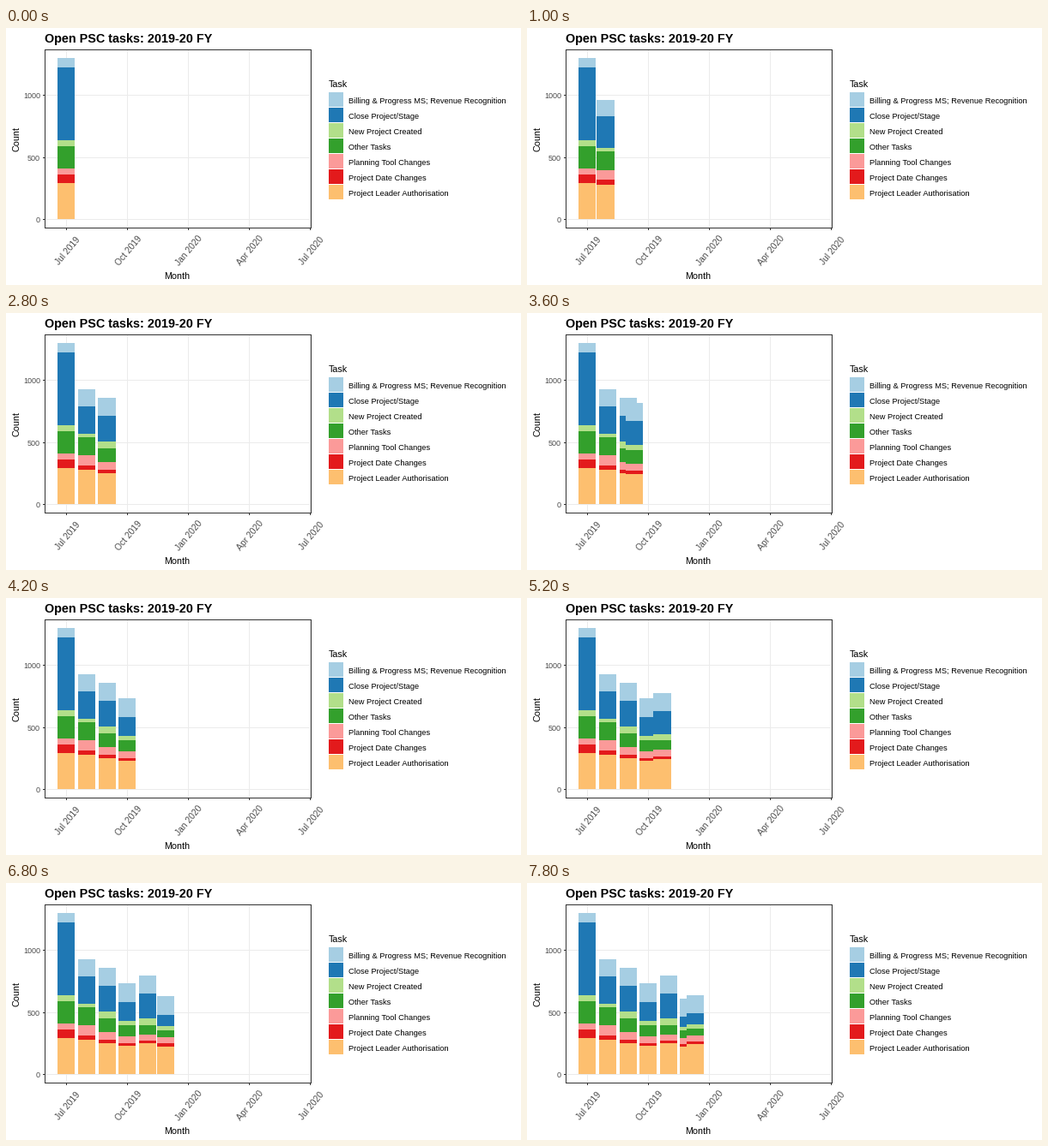
Recreate the animation shown at these times as a matplotlib script. Size 600 by 300 pixels, loop 8000 ms.

```python
import matplotlib.pyplot as plt
import numpy as np
from matplotlib.animation import FuncAnimation
from matplotlib.patches import Rectangle

W, H, DPI = 600, 300, 100
FRAMES, INTERVAL = 40, 200

TASKS = {
    "Billing & Progress MS; Revenue Recognition": "#A6CEE3",
    "Close Project/Stage": "#1F78B4",
    "New Project Created": "#B2DF8A",
    "Other Tasks": "#33A02C",
    "Planning Tool Changes": "#FB9A99",
    "Project Date Changes": "#E31A1C",
    "Project Leader Authorisation": "#FDBF6F",
}
GRID, DARK, GREY = "#EBEBEB", "#333333", "#4D4D4D"

BASE = 223
DAY_PX = 0.776
LEFT, RIGHT = 59.53, 79.77

MONTHS = np.arange("2019-07", "2020-08", dtype="datetime64[M]")
DATES = MONTHS.astype("datetime64[D]")
DAYS = (DATES - DATES[0]).astype(int)

# Monthly totals and largest steady share, in pixels; the rest follow trends.
TOTAL = np.array([188.4, 134, 124, 105.7, 115, 88, 101])
LEADER = np.array([42, 40, 36, 33, 36, 32, 40])


def stack_tops():
    m = np.arange(len(TOTAL))
    billing = 21.5 - 10.5 * 0.15 ** m
    created = 6 + 1.5 * (-1.0) ** m
    other = 26 * 0.8 ** m
    planning = 7 + 26 * m * 0.2 ** m
    dates = 3.2 + 6.8 * 0.25 ** m
    closed = TOTAL - (billing + created + other + planning + dates + LEADER)
    parts = np.array([billing, closed, created, other, planning, dates, LEADER])
    return BASE - np.cumsum(parts[::-1], axis=0)[::-1].T


TOPS = stack_tops()
STARTS = [int(7.2 * i + 0.65) for i in range(len(TOTAL))]

plt.rcParams["font.family"] = "Liberation Sans"
fig = plt.figure(figsize=(W / DPI, H / DPI), dpi=DPI, facecolor="white")
ax = fig.add_axes([0, 0, 1, 1])
ax.set_xlim(0, W)
ax.set_ylim(H, 0)
ax.axis("off")


def box(x0, y0, x1, y1, color, z=1):
    patch = Rectangle((x0, y0), x1 - x0, y1 - y0, facecolor=color,
                      linewidth=0, antialiased=False, snap=False, zorder=z)
    return ax.add_patch(patch)


def label(x, y, text, px, color="black", ha="left", va="baseline", **kw):
    ax.text(x, y, text, fontsize=px * 72 / DPI, color=color, ha=ha, va=va, **kw)


def whole(v):
    return np.floor(np.asarray(v) + 0.5).astype(int)


def new_bar(z):
    return [box(0, 0, 0, 0, color, z) for color in TASKS.values()]


def place(bar, day, tops):
    x0, x1 = whole([LEFT + day * DAY_PX, RIGHT + day * DAY_PX])
    ys = np.append(whole(tops), BASE)
    for part, y0, y1 in zip(bar, ys, ys[1:]):
        part.set_bounds(x0, y0, x1 - x0, y1 - y0)


def ease(t):
    return 4 * t ** 3 if t < 0.5 else 1 - 4 * (1 - t) ** 3


def draw_panel():
    for date, day in zip(DATES[::3], DAYS[::3]):
        x = int(70.1 + day * DAY_PX)
        box(x, 26, x + 1, 233, GRID)
        box(x, 234, x + 1, 236, DARK)
        label(x + 1.8, 259.7, date.item().strftime("%b %Y"), 10.2, GREY,
              "center", "center", rotation=50)
    for count in (0, 500, 1000):
        y = int(BASE + 0.5 - 0.145 * count)
        box(46, y, 355, y + 1, GRID)
        box(43, y, 45, y + 1, DARK)
        label(40, y + 4.3, str(count), 9, GREY, "right")
    for x in (45, 355):
        box(x, 25, x + 1, 234, DARK, 5)
    for y in (25, 233):
        box(45, y, 356, y + 1, DARK, 5)
    label(45, 17, "Open PSC tasks: 2019-20 FY", 14.45, weight="bold")
    label(199.5, 293, "Month", 10.8, ha="center")
    label(12.2, 129.5, "Count", 10.8, ha="center", va="center", rotation=90)


def draw_legend():
    label(376, 69, "Task", 10.7)
    for i, (name, color) in enumerate(TASKS.items()):
        y = 75 + 18 * i
        box(376, y, 393, y + 17, color)
        label(399, y + 13, name, 9.3)


draw_panel()
draw_legend()
past = [new_bar(2) for _ in STARTS[:-1]]
for bar, day, tops in zip(past, DAYS, TOPS):
    place(bar, day, tops)
mover = new_bar(3)


def update(n):
    k = max(i for i, start in enumerate(STARTS) if start <= n)
    f = ease((n - STARTS[k]) / (STARTS[k + 1] - STARTS[k]))
    for i, bar in enumerate(past):
        for part in bar:
            part.set_visible(i <= k)
    place(mover, DAYS[k] + f * (DAYS[k + 1] - DAYS[k]),
          TOPS[k] + f * (TOPS[k + 1] - TOPS[k]))
    return mover


anim = FuncAnimation(fig, update, frames=FRAMES, interval=INTERVAL,
                     init_func=lambda: update(0), repeat=True, repeat_delay=0)
plt.show()
```
